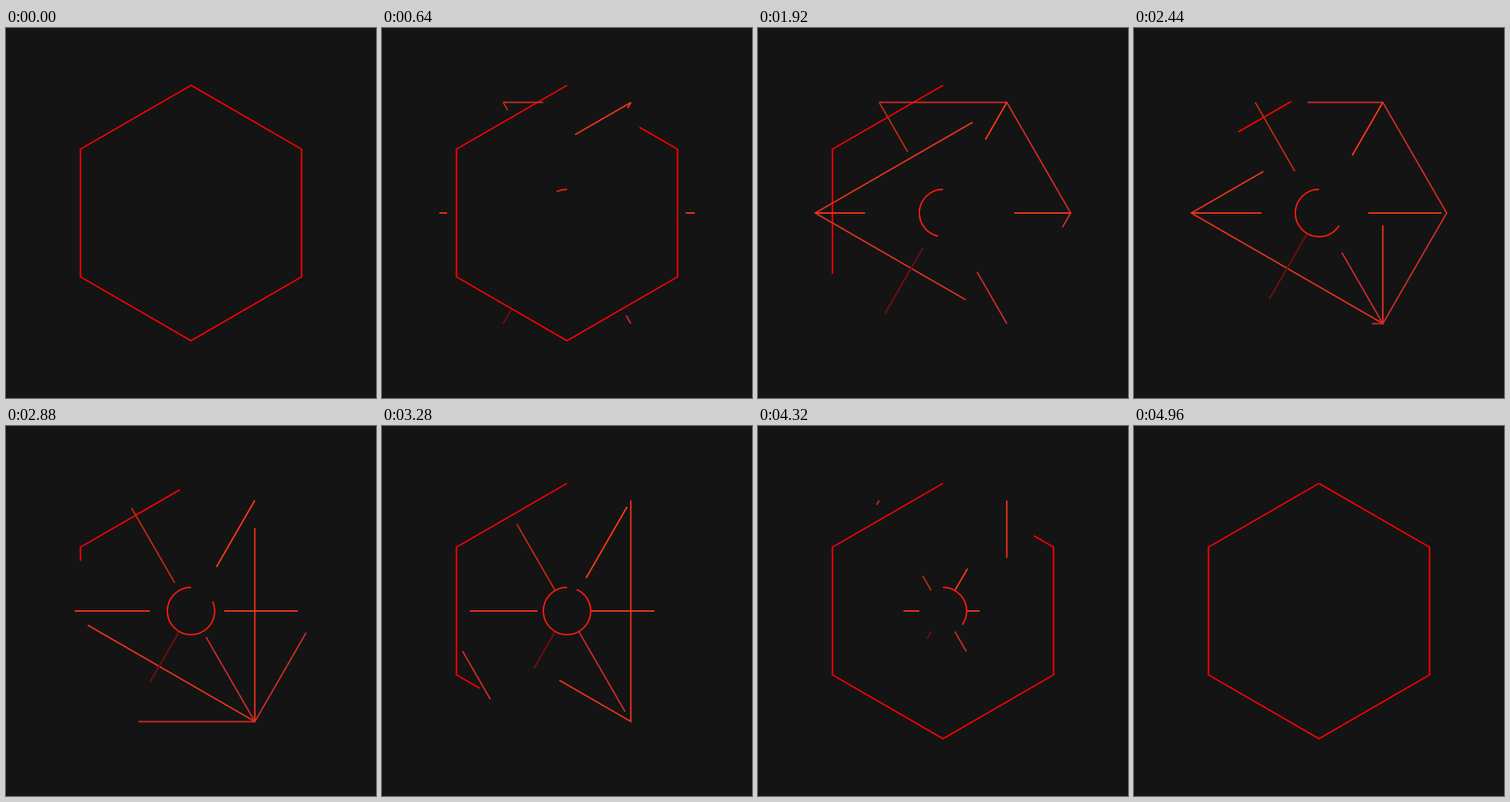
An HTML page for the animation above (5000 ms loop, 500 by 500 pixels).

```html
<!DOCTYPE html>
<html lang="en">
<head>
<meta charset="utf-8">
<title>Hexagon line loop</title>
<style>
  html, body { margin: 0; width: 100%; height: 100%; overflow: hidden; background: #141414; }
  svg { display: block; width: 100%; height: 100%; }
  path { fill: none; stroke-width: 2; }
</style>
</head>
<body>
<svg viewBox="0 0 500 500"></svg>
<script>
const LOOP = 5, CENTER = 250, OUTER = 172.5, INNER = 32;
const svg = document.querySelector('svg');

const point = (degrees, radius = OUTER) => {
  const a = degrees * Math.PI / 180;
  return `${CENTER + radius * Math.cos(a)} ${CENTER + radius * Math.sin(a)}`;
};
const polygon = (...angles) => `M${angles.map(a => point(a)).join('L')}Z`;
const spoke = angle => `M${point(angle)}L${point(angle, INNER)}`;
const halfArc = angle => `A${INNER} ${INNER} 0 0 0 ${point(angle, INNER)}`;
const circle = `M${point(-90, INNER)}${halfArc(90)}${halfArc(-90)}`;

const clamp = x => Math.min(1, Math.max(0, x));
const smooth = x => x * x * (3 - 2 * x);

// Smoothstep with a brisker finish: cubic-bezier(.333, 0, .76, 1)
function brisk(x) {
  let low = 0, high = 1;
  for (let i = 0; i < 24; i++) {
    const s = (low + high) / 2;
    if (s + 0.278 * (1 - s) * s * s < x) low = s; else high = s;
  }
  return smooth((low + high) / 2);
}
const progress = (t, from, to, ease = smooth) => ease(clamp((t - from) / (to - from)));

// Each stroke shows the part between its head and its tail.
const strokes = [];
function addStroke(d, color, head, tail) {
  const path = document.createElementNS(svg.namespaceURI, 'path');
  path.setAttribute('d', d);
  path.setAttribute('stroke', color);
  path.setAttribute('pathLength', 1);
  svg.append(path);
  strokes.push({ path, head, tail });
}

// The head draws the line until headEnd, the tail erases it from tailStart on.
function addSweep(d, color, headEnd, tailStart, tailEnd = 4.97) {
  addStroke(d, color,
    t => progress(t, 0, headEnd, brisk),
    t => progress(t, tailStart, tailEnd));
}

addStroke(polygon(-90, -150, 150, 90, 30, -30), '#ff0000',
  t => 1 - progress(t, 0, 3.12),
  t => progress(t, 2.08, 5));
addSweep(polygon(-120, -60, 0, 60, 120, 180), '#c92b27', 4.48, 2.16, 3.92);
addSweep(polygon(-60, 180, 60), '#e6331a', 3.19, 1.39);
addSweep(spoke(180), '#f5321a', 3.7, 2.34);
addSweep(spoke(0), '#f0371c', 3.4, 2.04);
addSweep(spoke(-60), '#ff3713', 4.08, 2.95);
addSweep(spoke(-120), '#b92b10', 3.37, 2.43);
addSweep(spoke(60), '#c8282a', 3.28, 2.84);
addSweep(spoke(120), '#7a0c0e', 2.44, 1.12);
addSweep(circle, '#ff1a0d', 3.76, 3.34);

function draw() {
  const t = performance.now() / 1000 % LOOP;
  for (const { path, head, tail } of strokes) {
    const a = head(t), b = tail(t);
    const start = Math.min(a, b), length = Math.abs(a - b);
    path.style.visibility = length > 0.0005 ? 'visible' : 'hidden';
    path.setAttribute('stroke-dasharray',
      length > 0.9999 ? 'none' : `0 ${start} ${length} 2`);
  }
  requestAnimationFrame(draw);
}
draw();
</script>
</body>
</html>
```
